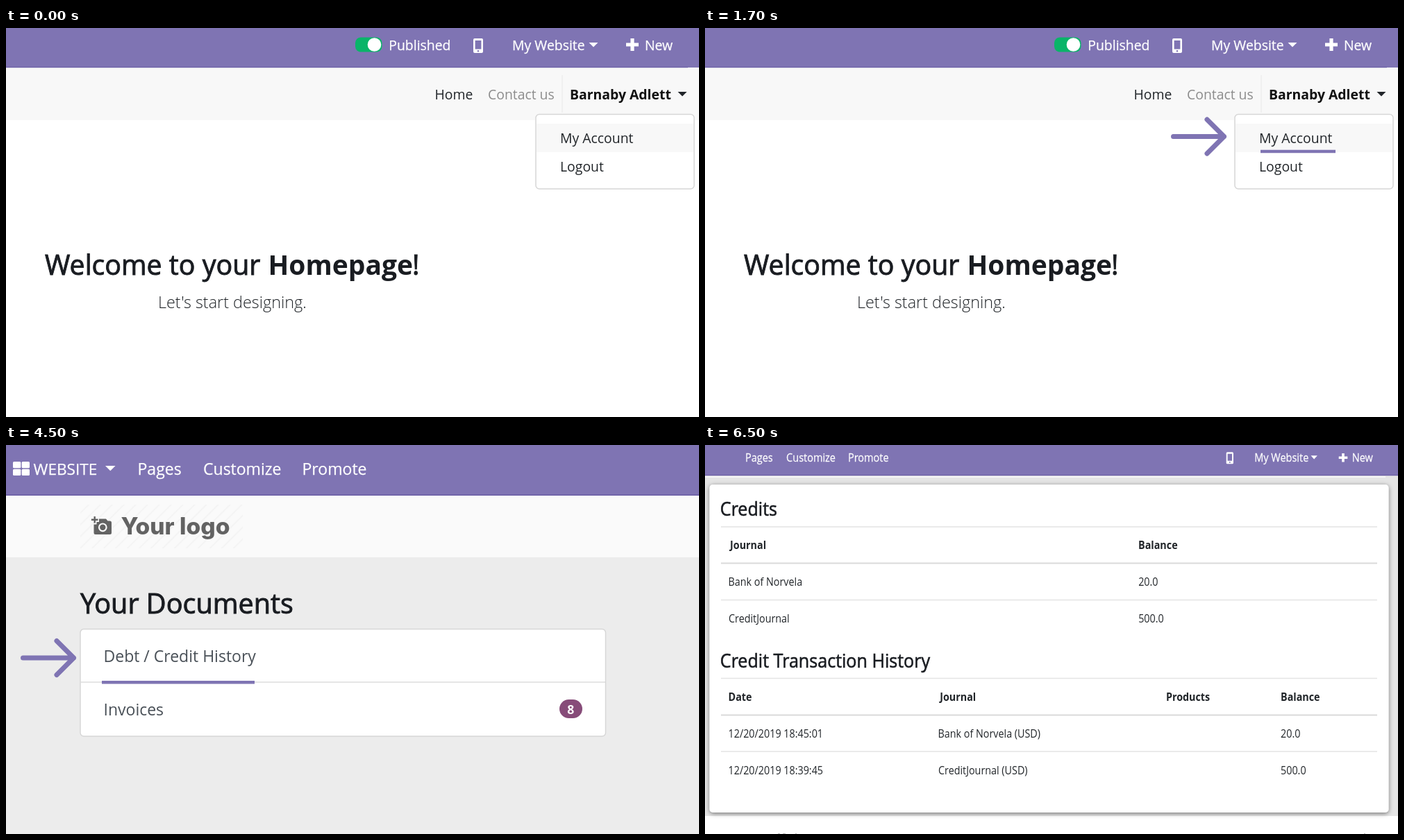
An HTML page that plays this animation: 998x561 px, repeating every 8 s.

```html
<!DOCTYPE html>
<html lang="en">
<head>
<meta charset="utf-8">
<title>Customer credit history</title>
<style>
html, body { margin: 0; width: 100%; height: 100%; overflow: hidden; background: #fff }
svg { display: block; width: 100vw; height: 100vh; font-family: "Open Sans", "Noto Sans", sans-serif; fill: #212529 }
text { white-space: pre }
.bar { fill: #7f74b3 }
.edge { fill: #6a5da5 }
.light { fill: #f8f8f8 }
.white { fill: #fff }
.white text { stroke: #fff; stroke-width: .25 }
.muted { fill: #495057 }
.bold { font-weight: 700 }
.h { fill: #191c21; stroke: #191c21; stroke-width: .9 }
.h .bold { stroke: none }
.mark { stroke: #7f74b3; fill: none }
.box { fill: #fff; stroke: #d6d6d6; stroke-width: 1.5 }
.line { stroke: #e4e4e4; stroke-width: 1.6; fill: none }
</style>
</head>
<body>
<svg viewBox="0 0 998 561">
  <defs>
    <path id="caret" d="M0 0h13l-6.5 6.5z"/>
    <path id="plus" d="M-2.6-9h5.2v6.4H9v5.2H2.6V9h-5.2V2.6H-9v-5.2h6.4z"/>
    <path id="phone" fill-rule="evenodd" d="M2 0h10q2 0 2 2v17q0 2-2 2H2q-2 0-2-2V2q0-2 2-2zM2.6 3v12.5h8.8V3zM5.7 18.2a1.3 1.3 0 1 0 2.6 0a1.3 1.3 0 1 0-2.6 0z"/>
    <path id="arrow" class="mark" stroke-width="7" stroke-linecap="round" stroke-linejoin="round" d="M0 0H73M48.5-24.5L73 0L48.5 24.5"/>
    <pattern id="hatch" width="12" height="12" patternUnits="userSpaceOnUse" patternTransform="rotate(45)">
      <path fill="#f4f4f4" d="M0 0h2v12h-2z"/>
    </pattern>
    <filter id="shadow" x="-5%" y="-5%" width="110%" height="110%">
      <feDropShadow dx="0" dy="1.5" stdDeviation="3" flood-opacity=".5"/>
    </filter>
  </defs>

  <g data-from="0" data-to="2500" font-size="19.4">
    <path class="white" d="M0 0h998v561H0z"/>
    <path class="light" d="M0 57h998v76H0z"/>
    <path class="bar" d="M0 0h998v57H0z"/>
    <path class="edge" d="M0 56h982v1.3H0z"/>
    <rect x="503" y="13.5" width="38.5" height="21" rx="8" fill="#0ab469"/>
    <g class="white">
      <circle cx="530.5" cy="24" r="9.8"/>
      <text x="551.3" y="32">Published</text>
      <use href="#phone" x="673" y="15"/>
      <text x="729" y="32">My Website</text>
      <use href="#caret" x="839.5" y="21"/>
      <use href="#plus" x="902" y="24"/>
      <text x="920" y="32">New</text>
    </g>
    <text x="617.5" y="103">Home</text>
    <text x="694" y="103" fill="#8c8c8c">Contact us</text>
    <path class="line" d="M801 68v54" style="stroke:#eee"/>
    <text class="bold" x="812" y="103" fill="#111">Barnaby Adlett</text>
    <use href="#caret" x="967.5" y="92"/>
    <rect class="box" x="763" y="124.5" width="228" height="107.5" rx="5"/>
    <path class="light" d="M764 138h226v41H764z"/>
    <text x="798" y="166">My Account</text>
    <text x="798" y="207">Logout</text>
    <g class="h" font-size="39.3">
      <text x="56" y="356">Welcome to your</text>
      <text class="bold" x="377.5" y="356" font-size="39">Homepage</text>
      <text x="585" y="356">!</text>
    </g>
    <text x="219" y="404" font-size="23.4" font-weight="300">Let's start designing.</text>
  </g>
  <g data-from="500" data-to="2500">
    <use href="#arrow" x="674.5" y="156.5"/>
    <path class="mark" stroke-width="4.5" d="M800 178h108"/>
  </g>

  <g data-from="2500" data-to="6500" font-size="23">
    <path fill="#ececec" d="M0 0h998v561H0z"/>
    <path fill="#fafafa" d="M0 73h998v89H0z"/>
    <path class="bar" d="M0 0h998v73H0z"/>
    <path class="edge" d="M0 71.5h998V73H0z"/>
    <g class="white">
      <rect x="10" y="24" width="11.3" height="9.3" rx="1.5"/>
      <rect x="22.7" y="24" width="11.3" height="9.3" rx="1.5"/>
      <rect x="10" y="34.7" width="11.3" height="9.3" rx="1.5"/>
      <rect x="22.7" y="34.7" width="11.3" height="9.3" rx="1.5"/>
      <text x="39.5" y="43" font-size="22.6">WEBSITE</text>
      <use href="#caret" transform="translate(143 30) scale(1.12)"/>
      <text x="189.5" y="43">Pages</text>
      <text x="284" y="43">Customize</text>
      <text x="426.5" y="43">Promote</text>
    </g>
    <path fill="url(#hatch)" d="M107 86h234v63H107z"/>
    <g fill="#636363">
      <path d="M126.5 103h2.4v3.6h3.6v2.4h-3.6v3.6h-2.4V109h-3.6v-2.4h3.6z"/>
      <path d="M134 106.5h10l2.5 3h3q2.5 0 2.5 2.5v14.5q0 2.5-2.5 2.5H129q-2.5 0-2.5-2.5V114.5h4v-3.5h3.5z"/>
      <circle cx="139.3" cy="118.8" r="5.3" fill="none" stroke="#fafafa" stroke-width="2.2"/>
      <text x="165.5" y="129" font-family="Inter, sans-serif" font-size="33.5" font-weight="800">Your logo</text>
    </g>
    <text class="h" x="107" y="243" font-size="39.6">Your Documents</text>
    <rect class="box" x="107" y="265.5" width="756.5" height="154.5" rx="5"/>
    <path class="line" d="M107 342h756" style="stroke:#dcdcdc"/>
    <text class="muted" x="140.5" y="313">Debt / Credit History</text>
    <text class="muted" x="140.5" y="390">Invoices</text>
    <rect x="797" y="367" width="33" height="27" rx="13.5" fill="#874c79"/>
    <text class="white bold" x="813.3" y="387.5" font-size="17.5" text-anchor="middle">8</text>
  </g>
  <g data-from="4500" data-to="6500">
    <use href="#arrow" x="24.5" y="307"/>
    <path class="mark" stroke-width="4.5" d="M138 342.3h220"/>
  </g>

  <g data-from="6500" data-to="8000">
    <path class="white" d="M0 0h998v561H0z"/>
    <path fill="#e5e5e5" d="M0 44h998v491H0z"/>
    <path class="bar" d="M0 0h998v44H0z"/>
    <path class="edge" d="M0 43h998v1.3H0z"/>
    <path fill="#f6f6f6" d="M0 45h980v2H0z"/>
    <rect class="white" x="6.5" y="57" width="978" height="473" rx="5" filter="url(#shadow)"/>
    <path class="line" d="M23 118h945M23 223.5h945M23 336.5h945M23 442h945"/>
    <path class="line" d="M23 170.5h945M23 389.5h945" style="stroke:#dadada;stroke-width:2"/>
    <path stroke="#bbb" d="M105 560.5h3m4 0h4m14 0h2M949 560.5h2"/>
    <g class="white">
      <use href="#phone" transform="translate(750.7 10.3) scale(.73 .81)"/>
      <use href="#caret" transform="translate(872.5 15.3) scale(.72 .8)"/>
      <use href="#plus" transform="translate(919 18.3) scale(.7)"/>
    </g>
    <!-- this screen is shown slightly narrowed -->
    <g transform="scale(.89 1)" font-size="16.1">
      <g class="white" font-size="16.3">
        <text x="65.2" y="24.5">Pages</text>
        <text x="131.6" y="24.5">Customize</text>
        <text x="231.5" y="24.5">Promote</text>
        <text x="889" y="24.5">My Website</text>
        <text x="1047" y="24.5">New</text>
      </g>
      <g class="h" font-size="28.2" style="stroke-width:.6">
        <text x="24.5" y="102">Credits</text>
        <text x="24.5" y="321">Credit Transaction History</text>
      </g>
      <g class="bold">
        <text x="40.5" y="150">Journal</text>
        <text x="701.2" y="150">Balance</text>
        <text x="37.7" y="369">Date</text>
        <text x="380" y="369">Journal</text>
        <text x="746" y="369">Products</text>
        <text x="931.5" y="369">Balance</text>
      </g>
      <text x="37.7" y="203.5">Bank of Norvela</text>
      <text x="701.3" y="203.5">20.0</text>
      <text x="38.3" y="256">CreditJournal</text>
      <text x="701.3" y="256">500.0</text>
      <text x="37.7" y="422.5">12/20/2019 18:45:01</text>
      <text x="377" y="422.5">Bank of Norvela (USD)</text>
      <text x="931.5" y="422.5">20.0</text>
      <text x="37.7" y="475">12/20/2019 18:39:45</text>
      <text x="377.6" y="475">CreditJournal (USD)</text>
      <text x="931.5" y="475">500.0</text>
    </g>
  </g>
</svg>
<script>
const LOOP = 8000;
const layers = [...document.querySelectorAll("[data-from]")];
const start = performance.now();

function draw() {
  const t = (performance.now() - start) % LOOP;
  for (const { style, dataset } of layers)
    style.display = t >= +dataset.from && t < +dataset.to ? "" : "none";
  requestAnimationFrame(draw);
}
draw();
</script>
</body>
</html>
```
